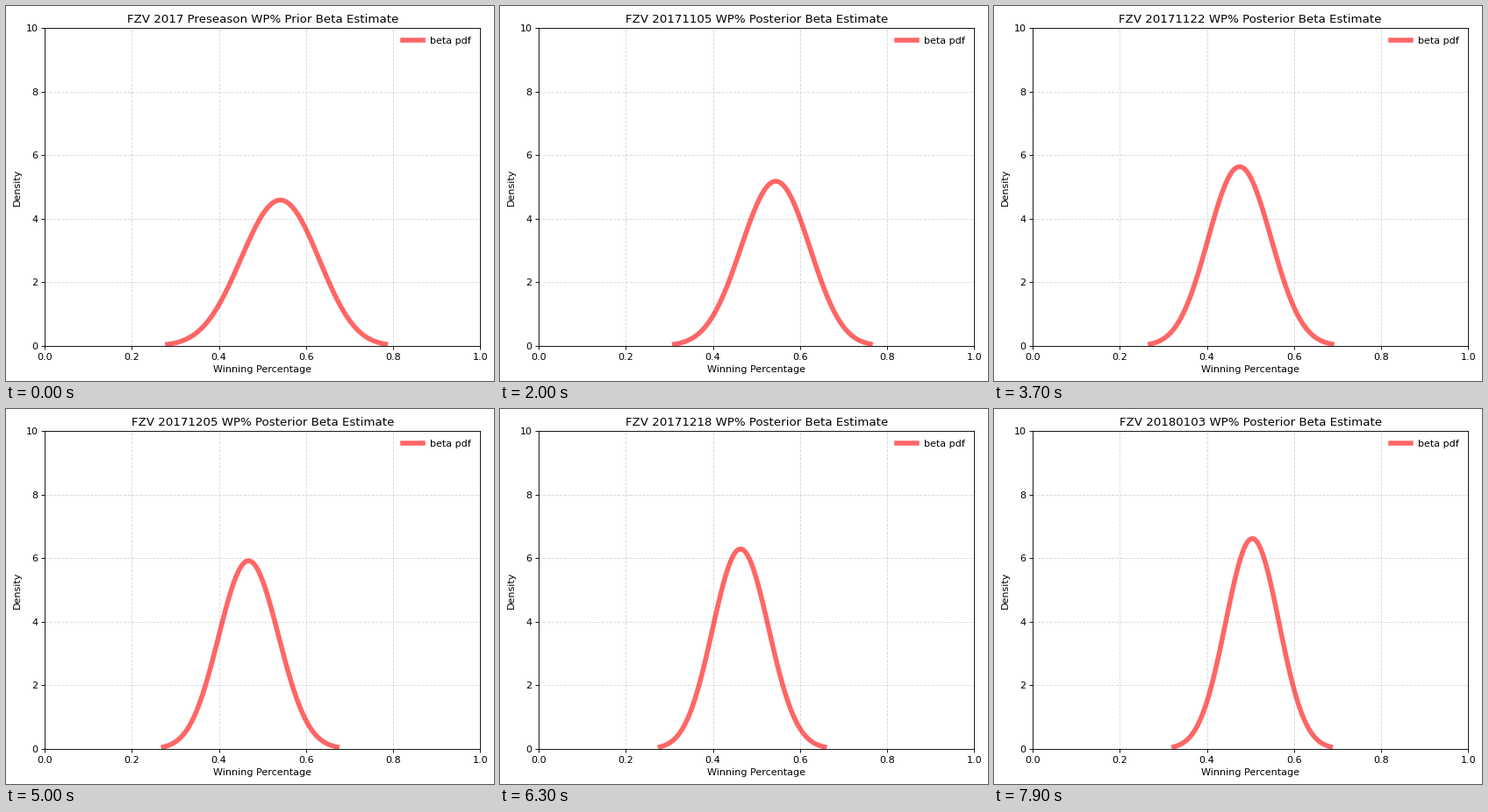
A matplotlib script that plays this animation: 556x428 px, repeating every 8000 ms.

```python
import math

import matplotlib.pyplot as plt
import numpy as np
from matplotlib.animation import FuncAnimation

W, H, DPI = 556, 428, 80
# Axes box in pixels from the lower left corner
LEFT, BOTTOM, WIDTH, HEIGHT = 44.22, 40.22, 496, 362.4
DAYS = 80
TEAM = "FZV"
START = np.datetime64("2017-10-16")

# Beta prior, and the days on which games were won or lost
PRIOR_A, PRIOR_B = 17.96, 15.39
WINS = [3, 5, 8, 10, 16, 37, 40, 42, 54, 56, 58, 65, 67, 71, 74, 76, 78]
LOSSES = [12, 14, 19, 20, 22, 25, 26, 28, 32, 33, 35, 45, 47, 48, 51,
          60, 61, 63, 68]

plt.rcParams["font.family"] = "DejaVu Sans"
GRID = np.linspace(0, 1, 8001)[1:-1]


def beta_pdf(x, a, b):
    norm = math.lgamma(a + b) - math.lgamma(a) - math.lgamma(b)
    return np.exp(norm + (a - 1) * np.log(x) + (b - 1) * np.log(1 - x))


def beta_curve(a, b):
    """Density between the 0.1% and 99.9% quantiles."""
    cdf = np.cumsum(beta_pdf(GRID, a, b))
    lo, hi = np.interp([0.001, 0.999], cdf / cdf[-1], GRID)
    x = np.linspace(lo, hi, 100)
    return x, beta_pdf(x, a, b)


def played(days, today):
    return sum(d <= today for d in days)


def heading(day):
    if day == 0:
        return f"{TEAM} 2017 Preseason WP% Prior Beta Estimate"
    date = str(START + day).replace("-", "")
    return f"{TEAM} {date} WP% Posterior Beta Estimate"


fig = plt.figure(figsize=(W / DPI, H / DPI), dpi=DPI, facecolor="white")
ax = fig.add_axes([LEFT / W, BOTTOM / H, WIDTH / W, HEIGHT / H])
ax.set(xlim=(0, 1), ylim=(0, 10),
       xlabel="Winning Percentage", ylabel="Density")
ax.grid(linestyle="--", alpha=0.5)
line, = ax.plot([], [], "r-", lw=5, alpha=0.6, label="beta pdf")
ax.legend(loc="upper right", frameon=False)
title = ax.set_title(heading(0))


def update(day):
    line.set_data(*beta_curve(PRIOR_A + played(WINS, day),
                              PRIOR_B + played(LOSSES, day)))
    title.set_text(heading(day))
    return line, title


anim = FuncAnimation(fig, update, frames=DAYS, interval=100,
                     repeat=True, repeat_delay=0, blit=False)
plt.show()
```
